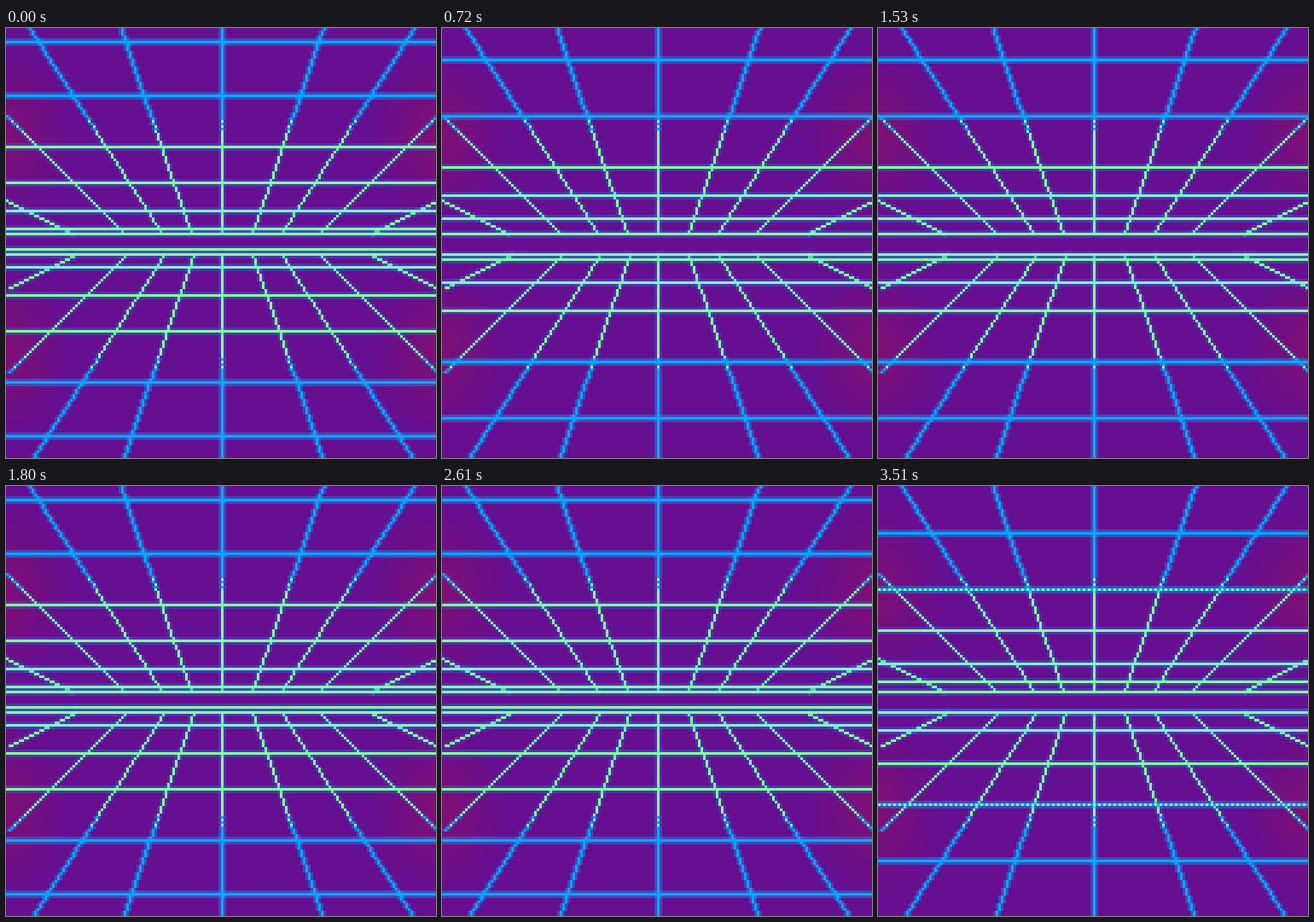
An HTML page with a canvas that plays this animation: 504x504 px, repeating every 3.6 s.

```html
<!DOCTYPE html>
<html lang="en">
<head>
<meta charset="utf-8">
<title>Neon grid</title>
<style>
  html, body { margin: 0; width: 504px; height: 504px; overflow: hidden; background: #660f90; }
  body {
    background-image:
      radial-gradient(75px 100px at 0 125px, #850f6ccc, #850f6c00),
      radial-gradient(75px 100px at 504px 125px, #850f6ccc, #850f6c00),
      radial-gradient(75px 100px at 0 379px, #850f6ccc, #850f6c00),
      radial-gradient(75px 100px at 504px 379px, #850f6ccc, #850f6c00);
  }
  canvas { display: block; width: 504px; height: 504px; image-rendering: pixelated; }
</style>
</head>
<body>
<canvas id="grid" width="168" height="168"></canvas>
<script>
const SIZE = 168, MID_X = 84, MID_Y = 84, HORIZON = 4;
const ctx = document.getElementById('grid').getContext('2d');
const BLUE = '#00a8ff', GREEN = '#90ff98', PALE = '#90ecd0';
const STEP_MS = 90;

// Distances a rung passes through, one per step, measured from its own centre row.
const RUNG_MID = 82;
const RUNGS = [4, 6, 8, 11, 13, 17, 22, 26, 28, 36, 42, 48, 56, 64, 70, 77];

// Each ray: x offset at the horizon, x offset at its far end, y of the far end.
const RAYS = [[12, 39.5, 0], [23.3, 75, 0], [38.3, 84, 34], [58.5, 84, 67]];

function dot(x, y, color, alpha = 1) {
  ctx.globalAlpha = alpha;
  ctx.fillStyle = color;
  ctx.fillRect(x, y, 1, 1);
}

function rayColor(y) {
  const d = Math.abs(y - MID_Y);
  return d < 44 || (d <= 48 && d % 2 === 0) ? GREEN : BLUE;
}

function ray(x0, y0, x1, y1) {
  const dx = x1 - x0, dy = y1 - y0;
  const steep = Math.abs(dy) > Math.abs(dx);
  const count = Math.round(Math.max(Math.abs(dx), Math.abs(dy)));
  const points = Array.from({ length: count + 1 }, (_, i) =>
    [Math.round(x0 + dx * i / count), Math.round(y0 + dy * i / count)]);
  for (const [x, y] of points) {
    const alpha = rayColor(y) === BLUE ? 0.38 : 0.2;
    for (const side of [-1, 1]) {
      dot(x + (steep ? side : 0), y + (steep ? 0 : side), BLUE, alpha);
    }
  }
  for (const [x, y] of points) dot(x, y, rayColor(y));
}

function rung(y, color) {
  ctx.fillStyle = BLUE;
  ctx.globalAlpha = color === BLUE ? 0.38 : 0.25;
  ctx.fillRect(0, y - 1, SIZE, 1);
  ctx.fillRect(0, y + 1, SIZE, 1);
  ctx.globalAlpha = 1;
  ctx.fillStyle = color;
  ctx.fillRect(0, y, SIZE, 1);
}

function drawRungs(phase) {
  for (let i = phase; i < RUNGS.length; i += 3) {
    const d = RUNGS[i];
    const color = d > 40 ? BLUE : d > 10 && d < 18 ? PALE : GREEN;
    for (const y of [RUNG_MID - d, RUNG_MID + d]) {
      rung(y, color);
      if (d === 42) for (let x = 0; x < SIZE; x += 2) dot(x, y, GREEN);
    }
  }
}

function draw(phase) {
  ctx.clearRect(0, 0, SIZE, SIZE);
  const top = MID_Y - HORIZON, bottom = MID_Y + HORIZON;
  for (const [near, far, end] of RAYS) {
    for (const side of [-1, 1]) {
      const shift = side < 0 ? 1 : 0;
      ray(MID_X + side * near, top, MID_X + side * far, end);
      ray(MID_X + side * near + shift, bottom, MID_X + side * far + shift, SIZE - end);
    }
  }
  ray(MID_X, top, MID_X, 0);
  ray(MID_X, bottom, MID_X, SIZE);
  drawRungs(phase);
  rung(top, GREEN);
  rung(bottom, GREEN);
}

function tick() {
  const step = Math.floor(performance.now() / STEP_MS);
  draw(step % 20 % 3);
  requestAnimationFrame(tick);
}
tick();
</script>
</body>
</html>
```
